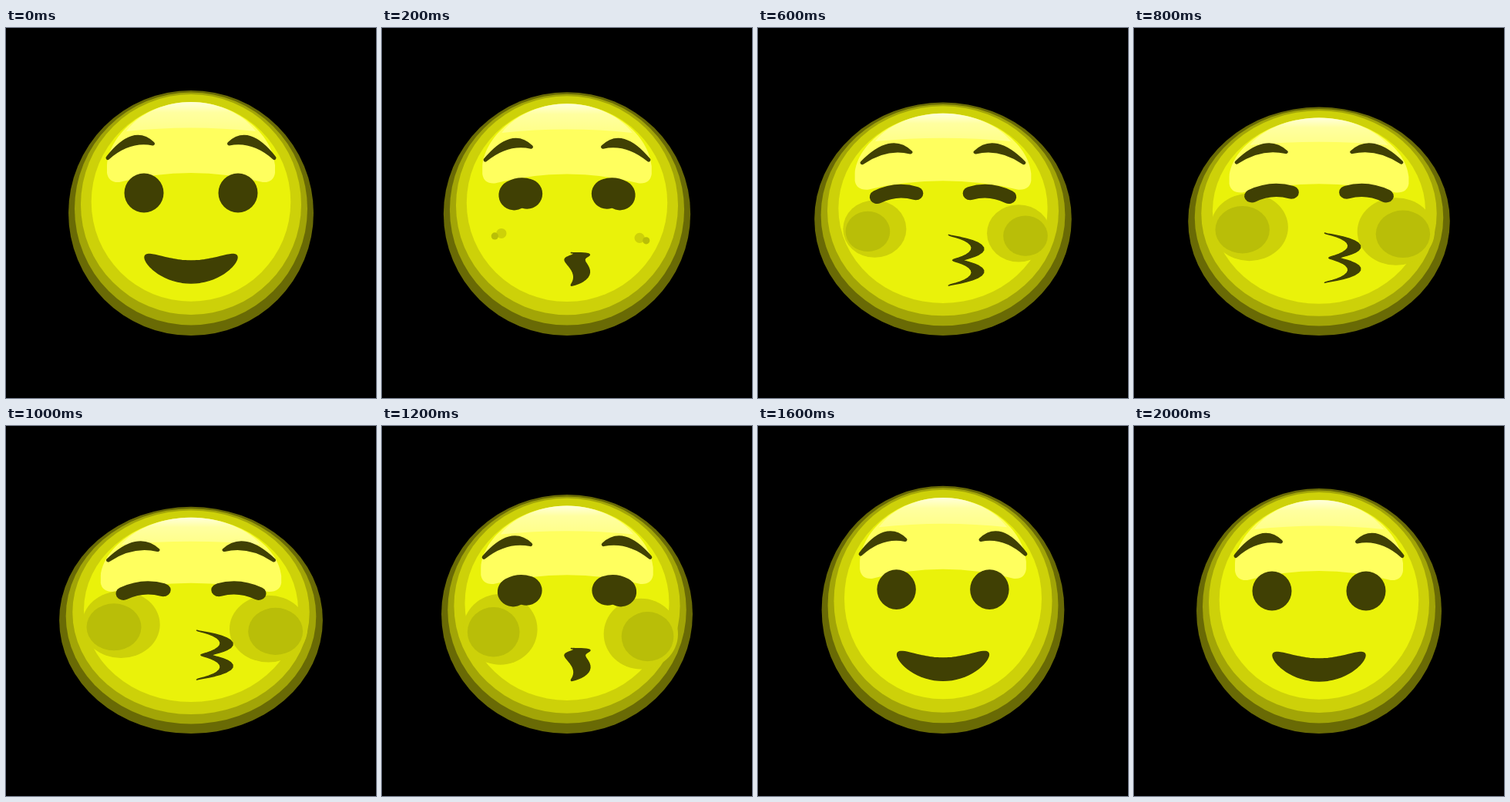
These frames come from a looping animation (480x480 px, 2100 ms). An HTML page:

```html
<!DOCTYPE html>
<html lang="en">
<head>
<meta charset="utf-8">
<title>Kissing face</title>
<style>
  html, body { margin: 0; width: 100%; height: 100%; overflow: hidden; background: #000; }
  svg { display: block; width: 100vw; height: 100vh; }
  .ink { fill: #404004; stroke: #404004; stroke-linejoin: round; stroke-linecap: round; }
  .brow { stroke-width: 5px; }
  .eye { fill: none; }
  #mouth { stroke-width: 1.5px; }
</style>
</head>
<body>
<svg viewBox="0 0 480 480">
  <defs>
    <linearGradient id="shine" gradientUnits="userSpaceOnUse" x1="0" y1="96" x2="0" y2="130">
      <stop offset="0" stop-color="#ffffdc"/>
      <stop offset=".4" stop-color="#ffffa0"/>
      <stop offset="1" stop-color="#ffff8c"/>
    </linearGradient>
    <g id="side">
      <path class="brow" d="M132 168.500Q165 126 190.500 150Q160 144 132 168.500Z"/>
      <path class="eye"/>
    </g>
  </defs>
  <g id="head">
    <circle cx="240" cy="240" r="159" fill="#696a05"/>
    <circle cx="240" cy="234.5" r="151" fill="#a2a507"/>
    <circle cx="240" cy="229" r="143" fill="#cdd109"/>
    <circle cx="240" cy="225.5" r="129.3" fill="#eaf20a"/>
    <path fill="#ffff5e" d="M131 178C134 137 182 96 240 96S346 137 349 178V188Q347 201 333 200Q240 176 147 200Q133 201 131 188Z"/>
    <path fill="url(#shine)" d="M156 134C175 108 210 96 240 96S305 108 324 134Q240 125 156 134Z"/>
  </g>
  <g id="features">
    <g id="blush"></g>
    <g class="ink">
      <use href="#side"/>
      <use href="#side" transform="matrix(-1 0 0 1 480 0)"/>
      <path id="mouth"/>
    </g>
  </g>
</svg>
<script>
const LOOP = 2100, STEP = 100, FLOOR = 399, LIFT = 285;
const { PI, sin, cos, max, min } = Math;
const $ = selector => document.querySelector(selector);
const lerp = (a, b, u) => a + (b - a) * u;

// Sine ease from 0 to 1 between two times.
const ease = (t, from, to) => (1 - cos(PI * min(1, max(0, (t - from) / (to - from))))) / 2;

function addCheek(cx, cy, r, fill) {
  const el = document.createElementNS('http://www.w3.org/2000/svg', 'circle');
  for (const [key, value] of Object.entries({ cx, cy, fill })) el.setAttribute(key, value);
  $('#blush').append(el);
  return { el, r };
}

const cheeks = [-1, 1].flatMap(side => {
  const x = 244.5 + 89 * side, y = 270.5 + 3 * side;
  return [
    addCheek(x, y, 47, '#cdd109'),
    addCheek(x + 8.5 * side, y + 3.5, 33, '#b9be08')
  ];
});

function squashAt(t) {
  if (t < 1400) return 0.075 * ease(t, 0, 1000) - 0.1 * ease(t, 1000, 1400);
  return -0.025 * max(0, (1800 - t) / 400) ** 1.3;
}

// A dot that flattens into a bowed line as the eye closes.
function eye(kiss) {
  const at = (x, y) => `${lerp(179, x, kiss)} ${lerp(214, y, kiss)}`;
  return `M${at(158.5, 224)}Q${at(182.4, 211)} ${at(206.3, 219)}h.01`;
}

// One edge point: s runs from the top of the lips to the bottom.
function lip(s, side, kiss) {
  const u = sin(PI * s), c = cos(PI * s), wave = sin(2 * PI * s) ** 2;
  const smile = (1 - kiss) ** 4;
  const pout = side > 0 ? 18.5 * u + 30 * wave : 5 * u + 25 * wave;
  const x = lerp(247, 240 + 60 * side * u, smile) + kiss * pout - (side < 0 ? 0 : 0) ;
  const smileY = 316.5 - 14.5 * c * (1 + 0.25 * u * u) - 19 * u * u;
  const kissY = 275.7 + 69 * (s - 0.05 * sin(4 * PI * s));
  return `${x.toFixed(2)} ${lerp(smileY, kissY, kiss).toFixed(2)}`;
}

function mouth(kiss) {
  const n = 32, points = [];
  for (let i = 0; i <= n; i++) points.push(lip(i / n, 1, kiss));
  for (let i = n; i >= 0; i--) points.push(lip(i / n, -1, kiss));
  return `M${points.join('L')}Z`;
}

function draw(t) {
  const p = squashAt(t);
  const squash = `translate(240 ${FLOOR}) scale(${1 + p} ${1 - p}) translate(-240 ${-FLOOR})`;
  $('#head').setAttribute('transform', squash);
  $('#features').setAttribute('transform', `${squash} translate(0 ${-LIFT * max(0, p)})`);

  const kiss = max(0, ease(t, 0, 400) - ease(t, 1000, 1400)) ** 1.5;
  $('.brow').setAttribute('transform', `translate(${8 * kiss} ${8.5 * kiss}) rotate(${4 * kiss} 129 170)`);
  $('.eye').setAttribute('d', eye(kiss));
  $('.eye').setAttribute('stroke-width', lerp(51, 18.5, kiss));
  $('#mouth').setAttribute('d', mouth(kiss));

  const grow = max(0, ease(t, 0, 820) - ease(t, 1200, 1500));
  for (const { el, r } of cheeks) el.setAttribute('r', r * grow);
}

const start = performance.now();
function tick() {
  const t = (performance.now() - start) % LOOP;
  draw(Math.floor(t / STEP) * STEP);
  requestAnimationFrame(tick);
}
tick();
</script>
</body>
</html>
```
